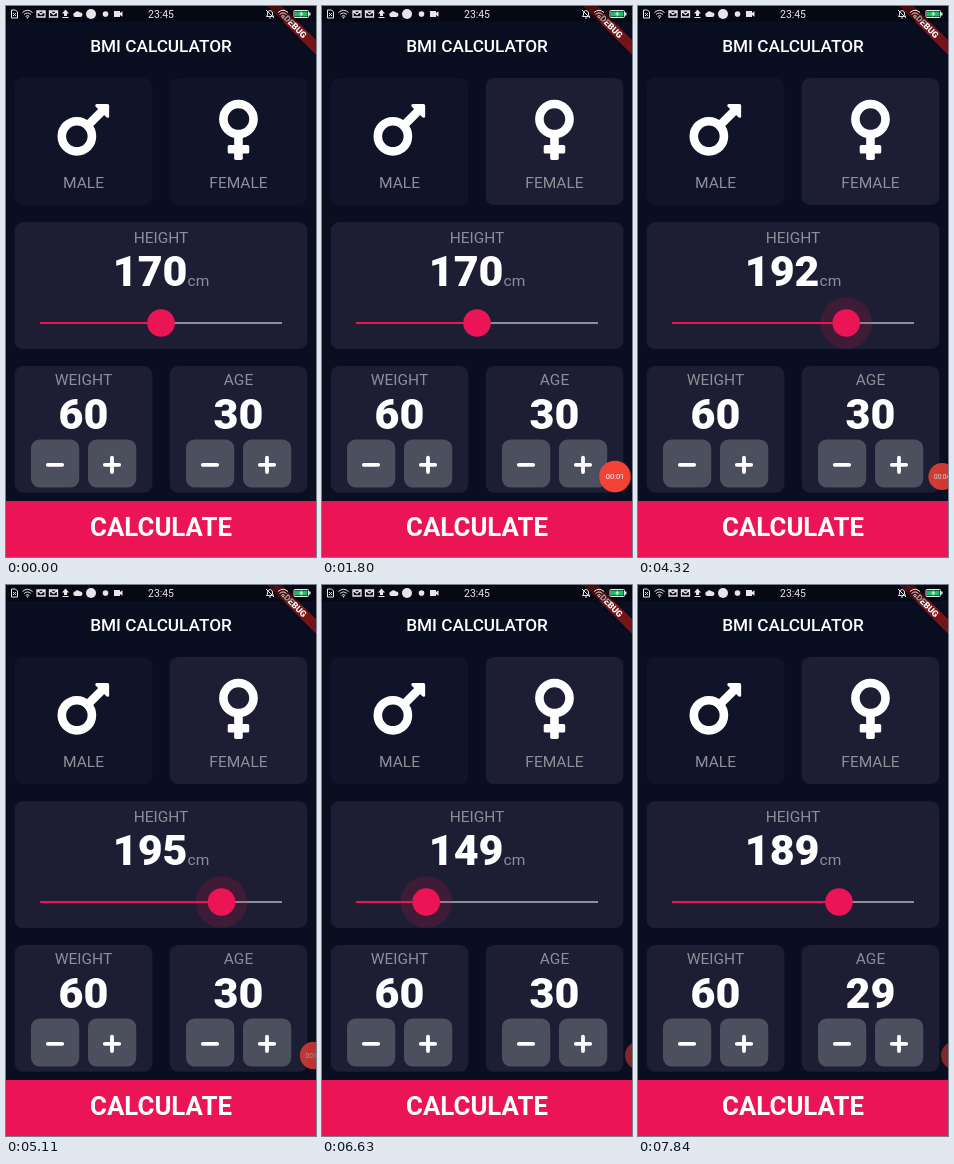
An HTML page for the animation above (8 s loop, 310 px wide and 551 px high).

```html
<!DOCTYPE html>
<html lang="en">
<head>
<meta charset="utf-8">
<title>BMI calculator</title>
<style>
  html, body { margin: 0; width: 100%; height: 100%; overflow: hidden; background: #0a0e21; }
  svg { display: block; width: 310px; height: 551px; }
  text { font-family: Roboto, sans-serif; fill: #fff; text-anchor: middle; }
  .label { font-size: 15.5px; fill: #8d8e98; }
  .number { font-size: 43px; font-weight: 900; }
  .card { fill: #1d1e33; }
  .button { fill: #4c4f5e; }
  .accent { fill: #eb1555; }
  .line { fill: none; stroke: #fff; }
</style>
</head>
<body>
<svg viewBox="0 0 310 551">
  <defs>
    <filter id="blur" x="-20%" y="-80%" width="140%" height="260%"><feGaussianBlur stdDeviation="2"/></filter>
    <g id="wifi" class="line" stroke-width="1">
      <path d="M-5-1.5Q0-6 5-1.5M-3.4.5Q0-2.6 3.4.5M-1.8 2.4Q0 .8 1.8 2.4"/>
      <circle cy="3.7" r=".5"/>
    </g>
    <path id="mail" class="line" stroke-width="1.3" d="M-4-3H4V3H-4ZL0 .5 4-3"/>
    <g id="stepper">
      <rect class="button" x="25" y="433.4" width="48.2" height="48.2" rx="8.6"/>
      <rect class="button" x="82" y="433.4" width="48.2" height="48.2" rx="8.6"/>
      <path class="line" stroke-width="3.8" stroke-linecap="round" d="M41.8 458.8H56.2M98.8 458.8H113.2M106 451.6V466"/>
    </g>
  </defs>
  <rect width="310" height="551" fill="#0a0e21"/>

  <text x="155" y="46" font-size="17.2" font-weight="500">BMI CALCULATOR</text>

  <rect x="8.6" y="72" width="137.8" height="127" rx="8.6" fill="#111328"/>
  <rect id="female" x="163.6" y="72" width="137.8" height="127" rx="8.6"/>
  <g transform="translate(51.5 89.4) scale(.1345)">
    <circle class="line" cx="144" cy="304" r="112" stroke-width="64"/>
    <path class="line" stroke-width="64" d="M230 218L338 110"/>
    <path d="M372 64h-79c-10.7 0-16 12.9-8.5 20.4l79.1 78.6c7.6 7.6 20.4 2.2 20.4-8.5V76c0-6.6-5.4-12-12-12z" fill="#fff"/>
  </g>
  <g transform="translate(213.1 89.4) scale(.1345)">
    <circle class="line" cx="144" cy="176" r="112" stroke-width="64"/>
    <rect x="112" y="300" width="64" height="180" rx="12" fill="#fff"/>
    <rect x="64" y="368" width="160" height="64" rx="12" fill="#fff"/>
  </g>
  <text class="label" x="77.5" y="182.4">MALE</text>
  <text class="label" x="232.5" y="182.4">FEMALE</text>

  <rect class="card" x="8.6" y="216.3" width="292.8" height="126.7" rx="8.6"/>
  <text class="label" x="155" y="237">HEIGHT</text>
  <text x="155" y="280.4"><tspan id="height" class="number">170</tspan><tspan class="label">cm</tspan></text>
  <path stroke="#8d8e98" stroke-width="1.8" d="M34 317H276"/>
  <path id="filled" stroke="#eb1555" stroke-width="1.8"/>
  <circle id="halo" class="accent" cy="317" opacity=".16"/>
  <circle id="thumb" class="accent" cy="317" r="13.8"/>

  <rect class="card" x="8.6" y="360" width="137.8" height="126.7" rx="8.6"/>
  <rect class="card" x="163.6" y="360" width="137.8" height="126.7" rx="8.6"/>
  <text class="label" x="77.5" y="379.3">WEIGHT</text>
  <text class="label" x="232.5" y="379.3">AGE</text>
  <text class="number" x="77.5" y="422.8">60</text>
  <text id="age" class="number" x="232.5" y="422.8">30</text>
  <use href="#stepper"/>
  <use href="#stepper" x="155"/>

  <rect class="accent" y="495" width="310" height="56"/>
  <text x="155" y="530.2" font-size="25.8" font-weight="700">CALCULATE</text>

  <g transform="translate(310 0) rotate(45)">
    <rect x="-34.4" y="24.1" width="68.8" height="10.3" opacity=".5" filter="url(#blur)"/>
    <rect x="-34.4" y="24.1" width="68.8" height="10.3" fill="#b71c1c" fill-opacity=".63"/>
    <text y="32.4" font-size="8.8" font-weight="900">DEBUG</text>
  </g>

  <rect width="310" height="16" opacity=".4"/>
  <g opacity=".9">
    <path class="line" stroke-width="1" d="M5.5 4H9.5L11.5 6V12H5.5ZM7 7L10 10M10 7L7 10"/>
    <use href="#wifi" x="21.5" y="8"/>
    <use href="#mail" x="35" y="8"/>
    <use href="#mail" x="47.5" y="8"/>
    <path fill="#fff" d="M59.5 3.5L63 7.5H61V10H58V7.5H56ZM56.5 11H62.5V12H56.5Z"/>
    <path fill="#fff" d="M69 11A2.4 2.4 0 0 1 69 6.4A3 3 0 0 1 74 6.6A2.2 2.2 0 0 1 74.5 11Z"/>
    <circle cx="85" cy="8" r="5" fill="#fff"/>
    <circle cx="99.5" cy="8" r="2.8" fill="#fff"/>
    <path fill="#fff" d="M108 5H114V7L116.5 5.2V10.8L114 9V11H108Z"/>
    <text x="155" y="11.8" font-size="10.4">23:45</text>
    <path class="line" stroke-width="1" d="M260.5 10.5H267.5L266.5 9V7Q266 4.5 264 4.5T261.5 7V9ZM263 12H265M260 4L268 12"/>
    <use href="#wifi" x="277" y="8"/>
    <rect class="line" x="288" y="4.5" width="14.5" height="7" rx="1"/>
    <rect x="289" y="5.5" width="12.5" height="5" fill="#19d46b"/>
    <path fill="#fff" d="M303 6.5H304.5V9.5H303ZM296 5L293 8.5H295L294.5 11L297.5 7.5H295.5Z"/>
  </g>

  <g id="bubble">
    <circle id="disc" fill="#f44336"/>
    <text id="timer" y="2.6" font-size="7.4"></text>
  </g>
</svg>
<script>
  const $ = id => document.getElementById(id);
  const set = (id, attrs) => { for (const k in attrs) $(id).setAttribute(k, attrs[k]); };
  const write = (id, s) => { if ($(id).textContent !== s) $(id).textContent = s; };

  // Linear interpolation through [time, value] points.
  function track(points, t) {
    const i = points.findIndex(p => p[0] > t);
    if (i === 0) return points[0][1];
    if (i < 0) return points[points.length - 1][1];
    const [t0, a] = points[i - 1], [t1, b] = points[i];
    return a + (b - a) * (t - t0) / (t1 - t0);
  }

  const LOOP = 8000;
  const heights = [[3920, 170], [4320, 192], [4390, 192], [4700, 206], [4900, 206], [5770, 162],
    [5900, 162], [6250, 141], [6450, 141], [6630, 149], [6710, 149], [7400, 189]];
  const haloRadius = [[3740, 0], [3920, 25.8], [7600, 25.8], [7820, 0]];
  const bubbleX = [[60, 328], [440, 293], [1860, 293], [2490, 304], [4900, 304], [5670, 317]];
  const bubbleR = [[1860, 15.8], [2490, 13.6], [4900, 13.6], [5670, 14]];
  const bubbleAlpha = [[1860, 1], [2490, .84], [4900, .84], [5670, .5]];

  function draw() {
    const t = performance.now() % LOOP;
    const height = Math.round(track(heights, t));
    const x = 34 + (height - 120) * 2.42;
    write('height', String(height));
    set('filled', { d: `M34 317H${x}` });
    set('thumb', { cx: x });
    set('halo', { cx: x, r: track(haloRadius, t) });
    set('female', { fill: t < 1250 ? '#111328' : '#1d1e33' });
    write('age', t < 7810 ? '30' : '29');

    const r = track(bubbleR, t);
    set('bubble', {
      transform: `translate(${track(bubbleX, t)} 470.5)`,
      opacity: track(bubbleAlpha, t)
    });
    set('disc', { r });
    set('timer', { 'font-size': r * .47, opacity: track([[4900, 1], [5500, 0]], t) });
    write('timer', '00:0' + Math.floor((t + 60) / 1000));
    requestAnimationFrame(draw);
  }
  draw();
</script>
</body>
</html>
```
